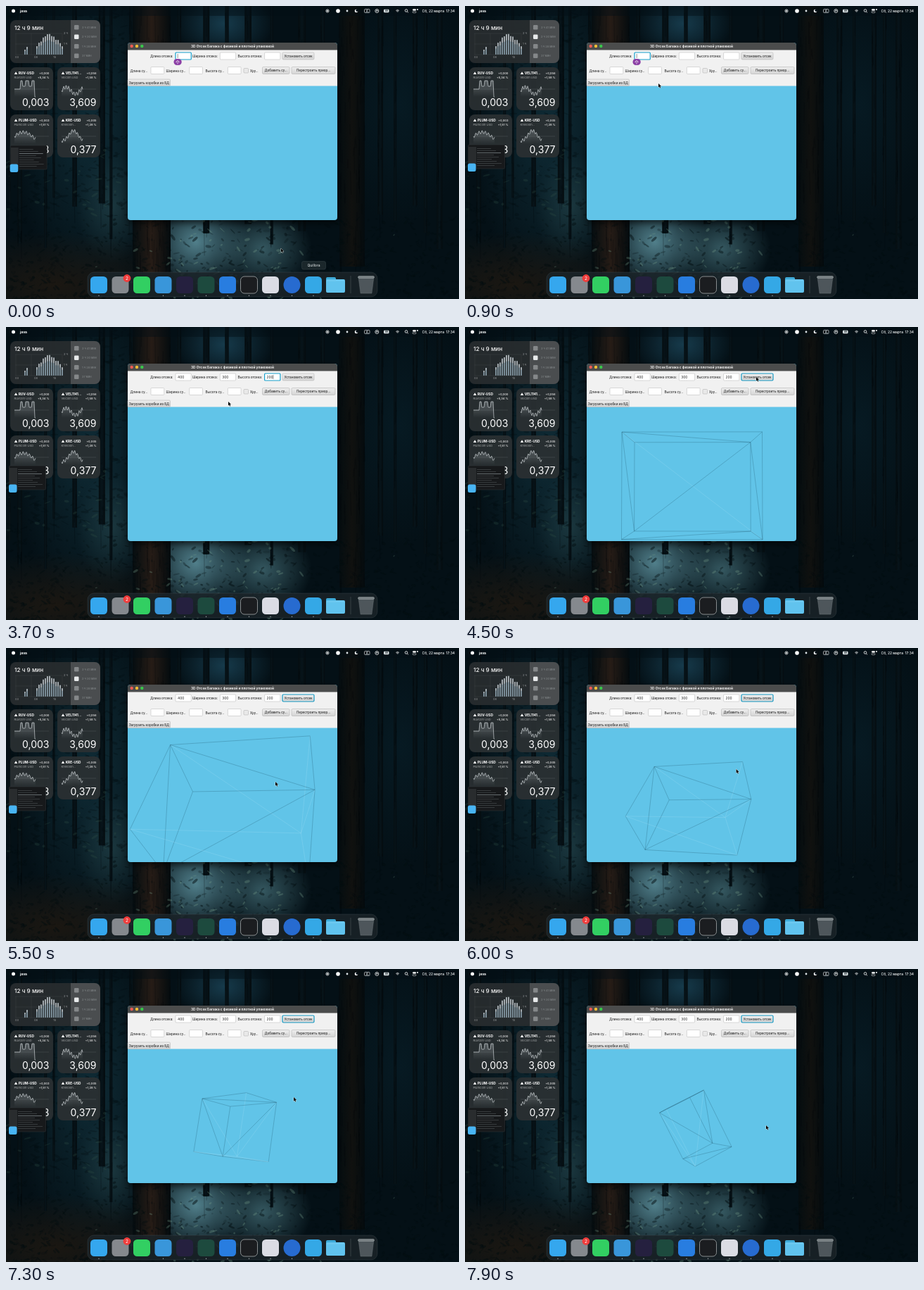
These frames come from a looping animation (644 by 416 pixels, 8000 ms). An HTML page with a canvas:

```html
<!DOCTYPE html>
<html lang="ru">
<head>
<meta charset="utf-8">
<title>3D Отсек</title>
<style>
html, body { margin: 0; width: 100%; height: 100%; overflow: hidden; background: #041016; }
canvas { display: block; width: 644px; height: 416px; }
</style>
</head>
<body>
<canvas id="stage"></canvas>
<script>
const W = 644, H = 416, LOOP = 8000;
const UI = 'Inter, sans-serif', FORM = 'Roboto, sans-serif';
const dpr = window.devicePixelRatio || 1;

function setUp(canvas) {
  canvas.width = W * dpr;
  canvas.height = H * dpr;
  const context = canvas.getContext('2d');
  context.scale(dpr, dpr);
  return context;
}
const screen2d = setUp(document.getElementById('stage'));
const desktop = document.createElement('canvas');
let c = setUp(desktop);

let seed = 11;
const random = () => (seed = (seed * 16807) % 2147483647) / 2147483647;
const between = (a, b) => a + (b - a) * random();
const clamp = v => Math.min(1, Math.max(0, v));
const smooth = v => v * v * (3 - 2 * v);

function box(x, y, w, h, r, fill, stroke, width = 0.5) {
  c.beginPath();
  c.roundRect(x, y, w, h, r);
  if (fill) { c.fillStyle = fill; c.fill(); }
  if (stroke) { c.strokeStyle = stroke; c.lineWidth = width; c.stroke(); }
}
function disc(x, y, r, fill, stroke) {
  c.beginPath();
  c.arc(x, y, r, 0, 7);
  if (fill) { c.fillStyle = fill; c.fill(); }
  if (stroke) { c.strokeStyle = stroke; c.lineWidth = 0.8; c.stroke(); }
}
function leaf(x, y, rx, ry, turn, fill) {
  c.beginPath();
  c.ellipse(x, y, rx, ry, turn, 0, 7);
  c.fillStyle = fill;
  c.fill();
}
function text(s, x, y, size, color = '#fff', { align = 'left', weight = 400, font = UI } = {}) {
  c.font = `${weight} ${size}px ${font}`;
  c.textAlign = align;
  c.fillStyle = color;
  c.fillText(s, x, y);
}
function path(points, color, width, close) {
  c.beginPath();
  points.forEach(([x, y]) => c.lineTo(x, y));
  if (close) c.closePath();
  c.strokeStyle = color;
  c.lineWidth = width;
  c.stroke();
}
function glow(x, y, rx, ry, rgb, alpha) {
  c.save();
  c.translate(x, y);
  c.scale(rx, ry);
  const g = c.createRadialGradient(0, 0, 0, 0, 0, 1);
  g.addColorStop(0, `rgba(${rgb},${alpha})`);
  g.addColorStop(1, `rgba(${rgb},0)`);
  c.fillStyle = g;
  c.fillRect(-1, -1, 2, 2);
  c.restore();
}

function drawTrunk(x, w, bottom, color) {
  const bark = c.createLinearGradient(x, 0, x + w, 0);
  bark.addColorStop(0, '#050d10');
  bark.addColorStop(0.5, color);
  bark.addColorStop(1, '#040b0e');
  c.fillStyle = bark;
  c.fillRect(x, 0, w, bottom);
  for (let i = 0; i < w * 2; i++) {
    const bx = x + between(0, w), by = between(0, bottom);
    path([[bx, by], [bx + between(-1, 1), by + between(10, 40)]], 'rgba(0,5,8,.35)', 0.8);
  }
}

function drawForest() {
  c.fillStyle = '#041016';
  c.fillRect(0, 0, W, H);
  glow(120, 170, 110, 230, '24,66,80', 0.55);
  glow(150, 285, 50, 80, '60,105,112', 0.35);
  glow(310, 25, 70, 50, '45,110,140', 0.45);
  glow(560, 140, 100, 170, '10,38,50', 0.45);
  glow(270, 335, 75, 70, '100,155,168', 0.8);
  glow(365, 345, 70, 60, '85,135,145', 0.6);
  glow(70, 395, 190, 75, '34,25,16', 0.75);
  for (let x = 4; x < W; x += between(12, 40)) {
    drawTrunk(x, between(3, 12), between(270, 345), '#07141a');
  }
  drawTrunk(180, 54, 385, '#261c16');
  drawTrunk(474, 36, 370, '#10110f');

  for (let i = 0; i < 900; i++) {
    const x = between(0, W), y = 416 - 115 * random() ** 1.4;
    const light = random() < 0.25 * Math.exp(-(((x - 310) / 110) ** 2));
    leaf(x, y, between(1, 5), between(0.5, 2), between(-1, 1),
      light ? 'rgba(120,160,140,.3)' : `rgba(3,13,15,${between(0.15, 0.5)})`);
  }
  for (let i = 0; i < 500; i++) {
    const x = between(0, 176), y = between(0, 300);
    leaf(x, y, between(1, 6), between(0.5, 2), between(-0.6, 0.6),
      random() < 0.2 && y > 200 ? 'rgba(50,85,70,.25)' : 'rgba(3,14,18,.3)');
  }
}

function drawMenuBar() {
  c.fillStyle = 'rgba(3,14,20,.45)';
  c.fillRect(0, 0, W, 14);
  disc(10.5, 7, 2.5, '#fff');
  text('java', 20, 8.8, 5, '#fff', { weight: 700 });
  disc(457, 7, 2.1, null, '#fff');
  disc(457, 7, 1, '#fff');
  disc(472, 7, 2.8, '#fff');
  disc(485, 7, 1.4, '#dce3e6');
  disc(498, 7, 2.3, '#fff');
  disc(499.2, 6.2, 1.8, '#051219');
  box(509.5, 4.5, 7.5, 5, 1, null, '#fff', 0.6);
  text('A', 513.2, 8.7, 4.5, '#fff', { align: 'center' });
  disc(527.3, 7, 2.5, null, '#fff');
  text('▶', 527.5, 8.1, 3, '#fff', { align: 'center' });
  box(537, 4.8, 7.5, 4.4, 1.2, '#dfe5e7');
  text('48', 540.7, 8.3, 3.4, '#17242a', { align: 'center', weight: 700 });
  for (const r of [1, 2.2, 3.4]) {
    c.beginPath();
    c.arc(556.6, 9, r, -2.3, -0.84);
    c.strokeStyle = '#fff';
    c.lineWidth = 0.7;
    c.stroke();
  }
  disc(569, 6.5, 1.8, null, '#fff');
  path([[570.3, 7.8], [572, 9.4]], '#fff', 0.8);
  box(578, 4.3, 5, 2.2, 1.1, '#fff');
  box(578, 7.5, 5, 2.2, 1.1, null, '#fff');
  disc(585, 5, 1, '#fff');
  text('Сб, 22 марта  17:34', 638, 8.8, 4.9, '#fff', { align: 'right', weight: 500 });
}

function drawUsageWidget() {
  box(6, 20, 128, 61, 8, 'rgba(40,45,47,.93)');
  box(92, 20, 42, 61, [0, 8, 8, 0], 'rgba(78,82,84,.9)');
  text('12 ч 9 мин', 12, 34, 8.2, '#f5f5f5', { weight: 500 });
  for (let i = 0; i < 3; i++) path([[13, 39 + i * 15], [80, 39 + i * 15]], 'rgba(255,255,255,.12)', 0.4);
  for (let i = 0; i < 4; i++) path([[14 + i * 22, 39], [14 + i * 22, 69]], 'rgba(255,255,255,.12)', 0.4);
  for (let i = 0; i < 15; i++) {
    const h = i < 2 ? 7 + 4 * i : 7 + 23 * Math.sin((i - 1) / 14 * Math.PI) * between(0.75, 1);
    const x = (i < 2 ? 26 : 37) + i * 3;
    box(x, 69 - h, 1.9, h, 0.4, '#7f929d');
    box(x, 69 - h, 1.9, h * 0.3, 0.4, '#a6acb0');
  }
  ['03', '08', '15'].forEach((s, i) => text(s, 13 + i * 27, 74, 4, '#9a9d9e'));
  ['2 ч', '1 ч'].forEach((s, i) => text(s, 82, 40 + i * 15, 4, '#9a9d9e'));
  ['3 ч 41 мин', '2 ч 30 мин', '1 ч 28 мин', '37 мин'].forEach((s, i) => {
    const y = 30 + i * 13.5;
    box(97, y - 3, 6.5, 6.5, 1.3, i === 1 ? '#e7e9ea' : 'rgba(190,194,196,.5)');
    text(s, 108, y + 1.6, 4, '#858a8c');
  });
}

function drawTicker(x, y, [code, change, name, percent, price], curve) {
  box(x, y, 61, 61, 8, 'rgba(43,48,50,.93)');
  text('▲ ' + code, x + 5.5, y + 10, 4.8, '#fff', { weight: 700 });
  text(change, x + 55.5, y + 9.8, 4, '#ddd', { align: 'right', weight: 600 });
  text(name, x + 5.5, y + 16, 4.1, '#a4a7a8');
  text(percent, x + 55.5, y + 16, 4, '#ddd', { align: 'right', weight: 600 });
  path([[x + 6, y + 31], [x + 55, y + 31]], 'rgba(255,255,255,.25)', 0.35);
  const points = Array.from({ length: 31 }, (_, i) => [x + 6 + i, y + curve(i)]);
  const shade = c.createLinearGradient(0, y + 20, 0, y + 42);
  shade.addColorStop(0, 'rgba(200,208,212,.3)');
  shade.addColorStop(1, 'rgba(200,208,212,0)');
  path([...points, [x + 36, y + 42], [x + 6, y + 42]], 'transparent', 0.1);
  c.fillStyle = shade;
  c.fill();
  path(points, '#c7cdd0', 0.7);
  text(price, x + 55.5, y + 55, 14, '#fff', { align: 'right' });
}

function drawDock() {
  box(116, 378, 412, 35, 9, 'rgba(26,36,40,.85)', 'rgba(120,135,138,.35)');
  const colors = ['#35a7ee', '#85898e', '#32cf62', '#3996da', '#25203f', '#1d4a3e',
    '#287de0', '#1b1d20', '#dbdce4', '#276bd0', '#34a8e6'];
  colors.forEach((color, i) => {
    const x = 132 + i * 30.5;
    box(x - 12, 384, 24, 24, i === 9 ? 12 : 5.5, color, i === 7 && '#a5a9aa', 0.8);
    if (i !== 1 && i !== 2) disc(x, 411.3, 0.7, '#aab1b3');
  });
  disc(172, 386.5, 5.4, '#ef3d3c');
  text('2', 172, 389, 6.5, '#fff', { align: 'center' });
  box(455, 385, 14, 8, 2, '#3eaad8');
  box(455, 388, 27, 19, 2, '#61c3ee');
  path([[456, 390], [481, 390]], '#8cd6f6', 0.5);
  path([[490, 383], [490, 408]], 'rgba(170,182,185,.45)', 0.5);
  path([[501, 385], [523, 385], [520, 408], [504, 408]], 'rgba(150,160,163,.5)', 0.5, true);
  c.fillStyle = 'rgba(115,124,128,.6)';
  c.fill();
  box(500.5, 383.5, 23, 3, 1.5, '#777f82', '#a5adaf');
}

const formText = (s, x, y, options) => text(s, x, y, 4.85, '#222', { font: FORM, ...options });
function drawButton(x, y, w, h, label, focused) {
  const face = c.createLinearGradient(0, y, 0, y + h);
  face.addColorStop(0, '#eeeeee');
  face.addColorStop(1, '#d4d4d4');
  box(x, y, w, h, 1.4, face, focused ? '#169ac4' : '#aaa', focused ? 1.2 : 0.5);
  formText(label, x + w / 2, y + h / 2 + 1.75, { align: 'center' });
}
function drawField(x, y, w, focused) {
  box(x, y, w, 10, 1, '#fff', focused ? '#16a0cc' : '#b5b5b5', focused ? 1.2 : 0.5);
}

function drawWindow() {
  c.save();
  c.shadowColor = 'rgba(0,0,0,.6)';
  c.shadowBlur = 10 * dpr;
  c.shadowOffsetY = 4 * dpr;
  box(173, 52, 298, 252, 4, '#61c4e8');
  c.restore();
  box(173, 52, 298, 11, [4, 4, 0, 0], '#4b4c4c');
  c.fillStyle = '#f1f1f1';
  c.fillRect(173, 62.5, 298, 51);
  ['#f35b53', '#f5bd35', '#39c64a'].forEach((color, i) => disc(178.7 + i * 7.3, 57, 2.2, color));
  text('3D Отсек Багажа с физикой и плотной упаковкой', 322, 58.8, 4.75, '#ededed',
    { align: 'center', weight: 700 });
  ['Длина', 'Ширина', 'Высота'].forEach((name, i) => {
    formText(name + ' отсека:', 237.5 + i * 63.3, 72.5, { align: 'right' });
    formText(name + ' су...', 201 + i * 54.5, 93.5, { align: 'right' });
    drawField(206 + i * 54.7, 86.5, 18.7);
  });
  box(338, 88.5, 6.5, 6.5, 1, '#e9e9e9', '#aaa');
  formText('Хру...', 347, 93.5);
  drawButton(364.5, 86.5, 38.5, 10, 'Добавить су...');
  drawButton(406, 86.5, 62, 10, 'Перестроить приор...');
  drawButton(173, 104, 60.5, 9.5, 'Загрузить коробки из БД');
}

function drawDesktop() {
  drawForest();
  drawMenuBar();
  drawUsageWidget();
  drawTicker(6, 87, ['RUV-USD', '+0,000', 'Ruvcoin USD', '+5,34 %', '0,003'],
    i => i > 28 ? 42 : i < 9 ? 31 : 23 - 4 * Math.sign(Math.cos(i * 0.7)));
  drawTicker(73, 87, ['VEL1141...', '+0,056', 'Velcoin USD', '+1,58 %', '3,609'],
    i => 33 - 5 * Math.sin(i / 4.2) + 3 * Math.sin(i * 1.7));
  drawTicker(6, 154, ['PLUM-USD', '+0,003', 'Plumcoin USD', '+1,51 %', '0,168'],
    i => 31 - 6 * Math.sin(i / 8) + 2.4 * Math.sin(i * 1.4));
  drawTicker(73, 154, ['KRE-USD', '+0,005', 'Krevolon...', '+1,28 %', '0,377'],
    i => 38 - 15 * Math.exp(-(((i - 17) / 9) ** 2)) + 2.5 * Math.sin(i * 1.6));
  drawDock();
  drawWindow();
}

// Each key holds a time followed by values; eases from key to key.
function ease(keys, t) {
  const next = Math.max(1, keys.findIndex(k => k[0] > t));
  const [a, b] = t >= keys.at(-1)[0] ? keys.slice(-2) : [keys[next - 1], keys[next]];
  const k = smooth(clamp((t - a[0]) / (b[0] - a[0])));
  return a.slice(1).map((v, i) => v + (b[i + 1] - v) * k);
}

const CLICK = 4400;
const POINTER = [[0, 391, 344], [850, 275, 110], [3600, 275, 110], [3700, 316, 106],
  [4200, 414, 71], [4600, 414, 71], [5500, 383, 190], [6700, 390, 142], [7900, 428, 222]];
// Time, yaw and pitch in degrees, zoom.
const VIEW = [[CLICK, 0, 0, 1.7], [5500, 18, 40, 2], [6300, 26.3, 48.2, 1],
  [6700, 26.3, 48.2, 1], [7900, 80, -27, 1]];
const KEYS = '400\t300\t200', FIRST_KEY = 1490, KEY_STEP = 212;

const HALF = [53, 40.5, 26.8], CENTER = [323, 226], FOCAL = 480;
// Corner number: bit 0 right, bit 1 down, bit 2 towards the viewer.
const TRIANGLES = ['473', '745', '512', '123', '157', '173', '042', '426', '041', '145', '263', '637']
  .map(s => s === '473' ? '476' : s === '512' ? '012' : s === '173' ? '137' : s === '263' ? '263' : s);

function drawBox(t) {
  const [yaw, pitch, zoom] = ease(VIEW, t);
  const [sy, cy, sp, cp] = [yaw, pitch].flatMap(d => [Math.sin(d * Math.PI / 180), Math.cos(d * Math.PI / 180)]);
  const corners = Array.from({ length: 8 }, (_, n) => {
    const [x, y, z] = HALF.map((h, bit) => h * zoom * (n >> bit & 1 ? 1 : -1));
    const tilted = y * sp + z * cp;
    const scale = FOCAL / (FOCAL - x * sy - tilted * cy);
    return [CENTER[0] + scale * (x * cy - tilted * sy), CENTER[1] + scale * (y * cp - z * sp)];
  });
  // Edges whose triangles all face the viewer are pale, the others dark.
  const edges = new Map();
  for (const triangle of TRIANGLES) {
    const ids = [...triangle];
    const [p, q, r] = ids.map(n => corners[n]);
    const area = (q[0] - p[0]) * (r[1] - p[1]) - (q[1] - p[1]) * (r[0] - p[0]);
    const shared = HALF.findIndex((_, bit) => ids.every(n => (n >> bit & 1) === (ids[0] >> bit & 1)));
    const flip = Math.sign((shared === 1 ? -1 : 1) * ((ids[0] >> shared & 1) - 0.5));
    const turn = ids.map(n => [0, 1, 2].filter(b => b !== shared).map(b => n >> b & 1));
    const winding = (turn[1][0] - turn[0][0]) * (turn[2][1] - turn[0][1])
      - (turn[1][1] - turn[0][1]) * (turn[2][0] - turn[0][0]);
    const front = area * flip * winding > 0;
    ids.forEach((n, i) => {
      const key = [n, ids[(i + 1) % 3]].sort().join('');
      edges.set(key, (edges.get(key) ?? true) && front);
    });
  }
  c.save();
  c.beginPath();
  c.rect(173, 114, 298, 190);
  c.clip();
  for (const [key, pale] of edges) {
    path([...key].map(n => corners[n]), pale ? 'rgba(150,218,242,.65)' : 'rgba(35,91,116,.6)', 0.5);
  }
  c.restore();
}

function drawForm(t) {
  const typed = KEYS.slice(0, Math.max(0, Math.ceil((t - FIRST_KEY) / KEY_STEP))).split('\t');
  const focus = t < CLICK ? typed.length - 1 : 3;
  for (let i = 0; i < 3; i++) {
    const x = 241 + i * 63.3, value = typed[i] || '';
    drawField(x, 66, 22.3, focus === i);
    text(value, x + 3, 72.7, 4.85, '#222');
    if (focus === i) {
      const caret = x + 3.2 + c.measureText(value).width;
      path([[caret, 68], [caret, 74]], '#222', 0.5);
    }
  }
  drawButton(393, 66, 45, 10, 'Установить отсек', focus === 3);
  if (t < FIRST_KEY) {
    box(238.5, 75, 11.2, 9, 4.5, '#8c3fa5');
    path([[244, 77], [246.3, 79.6], [241.7, 79.6]], '#fff', 0.6, true);
    path([[243, 81.8], [245, 81.8]], '#fff', 0.6);
  }
}

function drawPreview(t) {
  const shift = 1 - smooth(clamp((t - 100) / 500));
  c.save();
  c.translate(1.7 * shift, shift);
  box(4.5, 197, 52, 34, 1.5, '#17191b', '#323638');
  c.fillStyle = '#292c2e';
  c.fillRect(5, 200, 11, 30);
  for (let i = 0; i < 9; i++) {
    c.fillStyle = i === 2 ? '#899196' : '#454a4d';
    c.fillRect(17, 202 + i * 3, 20 + (i * 7) % 17, 0.7);
  }
  box(4, 223.5, 11.5, 11.5, 2.5, '#48b4f3');
  c.restore();
}

function drawPointer(t) {
  c.save();
  c.translate(...ease(POINTER, t));
  path([[0, 0], [0, 5.6], [1.3, 4.5], [2.2, 6.5], [3.2, 6], [2.3, 4.1], [4, 4]], '#e9f1f3', 0.8, true);
  c.fillStyle = '#050505';
  c.fill();
  c.restore();
}

function frame(now) {
  const t = now % LOOP;
  c.drawImage(desktop, 0, 0, W, H);
  drawPreview(t);
  drawForm(t);
  if (t >= CLICK) drawBox(t);
  if (t < 200) {
    box(420.5, 362.5, 34, 11.5, 2.5, '#1b272b', '#39474b');
    text('Quillora', 437.5, 370, 5, '#edf1f2', { align: 'center' });
  }
  drawPointer(t);
  requestAnimationFrame(frame);
}

drawDesktop();
c = screen2d;
requestAnimationFrame(frame);
</script>
</body>
</html>
```
